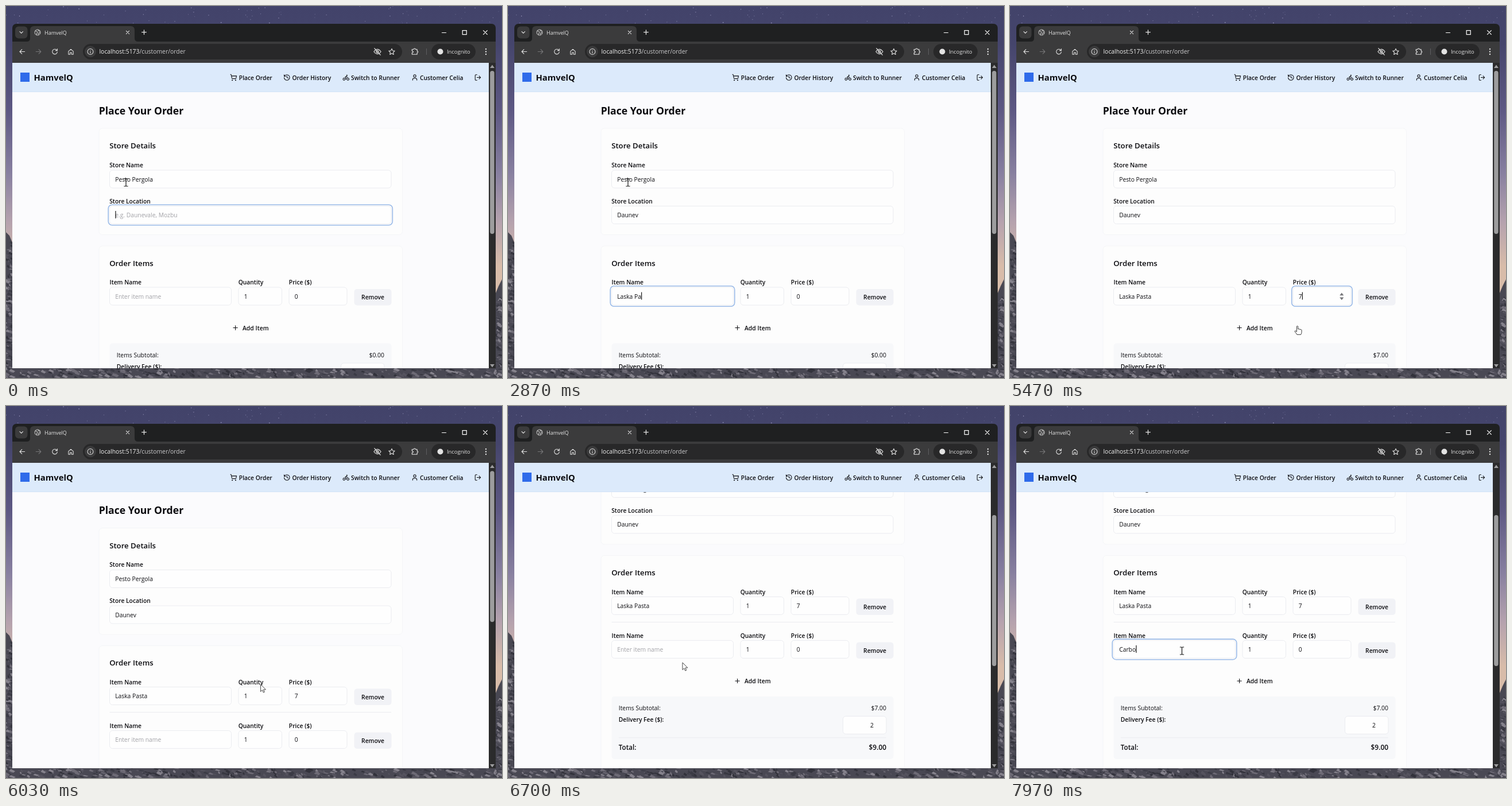
An HTML page for the animation above (8000 ms loop, 864 by 648 pixels).

```html
<!DOCTYPE html>
<html lang="en">
<head>
<meta charset="utf-8">
<title>Place Your Order</title>
<style>
html, body { margin: 0; width: 100%; height: 100%; overflow: hidden; background: #43446a; }
svg { display: block; width: 100vw; height: 100vh; }
text { font-family: "Open Sans", "Noto Sans", sans-serif; white-space: pre; }
</style>
</head>
<body>
<svg id="stage" viewBox="0 0 864 648"></svg>
<script>
const LOOP = 8000, ROW = 76, NOTCH = 78.8, BASE = 10.3;
const INK = '#0b0b0f', HINT = '#a1a1a6', LINE = '#e9eaef', CHROME = '#e3e3e3';

// ---- markup helpers ----
const rect = (x, y, w, h, fill, r = 0, more = '') =>
  `<rect x="${x}" y="${y}" width="${w}" height="${h}" rx="${r}" fill="${fill}" ${more}/>`;

// y is the middle of the capitals
function text(x, y, str, o = {}) {
  const size = o.size || BASE;
  return `<text ${o.id ? `id="${o.id}"` : ''} x="${x}" y="${y + size * 0.355}" font-size="${size}"` +
    ` font-weight="${o.weight || 400}" fill="${o.fill || INK}" text-anchor="${o.anchor || 'start'}">${str}</text>`;
}
const bold = (x, y, str, o = {}) => text(x, y, str, { weight: 600, ...o });

const ring = (x, y, r) => `M${x - r} ${y}a${r} ${r} 0 1 0 ${2 * r} 0a${r} ${r} 0 1 0 ${-2 * r} 0`;

function icon(cx, cy, size, d, color = CHROME, width = 2) {
  const k = size / 24;
  return `<path transform="translate(${cx - size / 2} ${cy - size / 2}) scale(${k})" d="${d}" fill="none"` +
    ` stroke="${color}" stroke-width="${width}" stroke-linecap="round" stroke-linejoin="round"/>`;
}

const ICON = {
  cart: ring(8, 21, 1) + ring(19, 21, 1) +
    'M2 2h2l2.7 12.4a2 2 0 0 0 2 1.6h9.8a2 2 0 0 0 1.9-1.6l1.6-7.4H5.1',
  history: 'M3 12a9 9 0 1 0 9-9 9.75 9.75 0 0 0-6.7 2.7L3 8M3 3v5h5M12 7v5l4 2',
  bike: ring(18.5, 17.5, 3.5) + ring(5.5, 17.5, 3.5) + ring(15, 5, 1) + 'M12 17.5V14l-3-3 4-3 2 3h2',
  user: 'M19 21v-2a4 4 0 0 0-4-4H9a4 4 0 0 0-4 4v2' + ring(12, 7, 4),
  logout: 'M9 21H5a2 2 0 0 1-2-2V5a2 2 0 0 1 2-2h4M16 17l5-5-5-5M21 12H9',
  plus: 'M5 12h14M12 5v14',
  cross: 'M5 5l14 14M19 5L5 19',
  chevron: 'M6 9l6 6 6-6',
  back: 'M20 12H4M11 5l-7 7 7 7',
  forward: 'M4 12h16M13 5l7 7-7 7',
  reload: 'M20 13a8 8 0 1 1-2.4-6.7L20 8.5M20 3v5.5h-5.5',
  home: 'M4 11l8-7 8 7v10h-5.5v-6h-5v6H4z',
  info: ring(12, 12, 9.5) + 'M12 11v6M12 7.4v.2',
  eye: 'M1.5 12Q12-2 22.5 12Q12 26 1.5 12z' + ring(12, 12, 3.5) + 'M3 2l18 20',
  star: 'M12 2.5l2.9 6.3 6.8.8-5 4.7 1.3 6.8-6-3.4-6 3.4 1.3-6.8-5-4.7 6.8-.8z',
  puzzle: 'M4 6h5a2.6 2.6 0 1 1 5.2 0H19v5a2.6 2.6 0 1 1 0 5.2V21H4v-5a2.6 2.6 0 1 0 0-5z',
  globe: ring(12, 12, 9.5) + 'M4 7l5 1 3 4-3 3v5M20 8l-5-1-1-4M21 14l-4-1-3 3 1 4'
};

// ---- desktop ----
let seed = 11;
const rnd = () => (seed = seed * 16807 % 2147483647) / 2147483647;

function desktop() {
  const stops = [[0, '#42436a'], [0.1, '#45456c'], [0.28, '#5d5883'], [0.45, '#8880a0'], [0.58, '#b5a2ae'], [0.7, '#d8bca9']];
  let s = '<linearGradient id="sky" x2="0" y2="1">' +
    stops.map(([o, c]) => `<stop offset="${o}" stop-color="${c}"/>`).join('') + '</linearGradient>';
  s += rect(0, 0, 864, 648, 'url(#sky)');
  for (let i = 0; i < 75; i++) {
    const r = 0.3 + rnd() * 0.5;
    s += `<circle cx="${rnd() * 864}" cy="${rnd() * 31}" r="${r}" fill="#b9b8dc" opacity="${0.3 + rnd() * 0.6}"/>`;
  }
  s += '<path d="M0 394L6 400L11 412V628H853V500L858 488L864 476V648H0z" fill="#494853"/>';
  const tones = ['#32323b', '#55535e', '#6e6b76', '#85828c', '#3b3b45'];
  const shards = (n, x, y, w, h) => {
    for (let i = 0; i < n; i++) {
      const px = x + rnd() * w, py = y + rnd() * h, a = 2 + rnd() * 7, b = 1 + rnd() * 4;
      s += `<path d="M${px} ${py}l${a} ${b}l${-a * 0.4} ${b * 0.6}l${-a} ${-b * 0.7}z" fill="${tones[i % 5]}"/>`;
    }
  };
  shards(100, -3, 408, 12, 235);
  shards(340, 0, 630, 864, 15);
  shards(65, 853, 502, 10, 140);
  return s;
}

// ---- browser window ----
function browser() {
  const bar = '#3b3b3c', dark = '#282829', tip = { size: 9, fill: CHROME };
  return `<path d="M11 631V38a7 7 0 0 1 7-7H846a7 7 0 0 1 7 7V631z" fill="#1f2021"/>` +
    rect(11, 62, 842, 37, bar) +
    rect(16, 35.5, 21.5, 21, bar, 6) + icon(26.7, 46, 11, ICON.chevron, CHROME, 2.6) +
    `<path d="M36 62q6 0 6-6V42q0-7 7-7H217q7 0 7 7V56q0 6 6 6z" fill="${bar}"/>` +
    icon(55, 46, 12.5, ICON.globe, '#c8c8c8') +
    text(67, 46.5, 'HamvelQ', tip) +
    icon(212, 46, 9, ICON.cross, CHROME, 2.8) + icon(240.5, 45.7, 13, ICON.plus, CHROME, 2.4) +
    `<path d="M759 46.5h8M795.2 42.6h7v7h-7zM831.2 42.4l7.4 7.4M838.6 42.4l-7.4 7.4" stroke="#fff" stroke-width="1.2" fill="none"/>` +
    icon(28.3, 79.5, 13, ICON.back) + icon(56.5, 79.5, 13, ICON.forward, '#747476') +
    icon(85, 79.5, 13, ICON.reload) + icon(113, 79.5, 12.5, ICON.home) +
    rect(134, 66, 556, 27, dark, 13.5) + `<circle cx="147" cy="79.5" r="10" fill="${bar}"/>` +
    icon(147, 79.5, 12.5, ICON.info) +
    text(162.5, 79.7, 'localhost:5173<tspan fill="#c9c9cb">/customer/order</tspan>', { size: 10.38, fill: '#f0f0f0' }) +
    icon(647, 79.5, 14, ICON.eye) + icon(672, 79.5, 13, ICON.star) + icon(712, 79, 14, ICON.puzzle) +
    rect(732, 74, 1, 11, '#5e5e60') + rect(741, 66, 77, 27, dark, 13.5) +
    `<circle cx="756.5" cy="79.5" r="5" fill="${CHROME}"/>` + text(768, 79.7, 'Incognito', { size: 9.4, fill: CHROME }) +
    [75, 79.5, 84].map(y => `<circle cx="836" cy="${y}" r="1.2" fill="${CHROME}"/>`).join('');
}

function header() {
  const nav = (ix, glyph, tx, label) => icon(ix, 124.5, 12.6, ICON[glyph], INK) + bold(tx, 125, label);
  return rect(11, 99, 830, 51, '#dceafb') + rect(11, 149, 830, 1, '#d3e3f6') +
    rect(25, 116, 16, 16, '#2f6bea') +
    bold(48.5, 125, 'HamvelQ', { size: 14.8, weight: 700 }) +
    nav(396.3, 'cart', 405.8, 'Place Order') + nav(489.3, 'history', 498.5, 'Order History') +
    nav(592.3, 'bike', 601, 'Switch to Runner') + nav(712, 'user', 721, 'Customer Celia') +
    icon(822, 124.5, 12.6, ICON.logout, INK);
}

function scrollbar() {
  return rect(841, 99, 12, 532, '#2b2b2c') + rect(843.2, 113, 7.4, 284, '#9d9d9e', 3.7, 'id="thumb"') +
    '<path d="M843 108l4-5.5 4 5.5zM843 624l4 5.5 4-5.5z" fill="#9d9d9e"/>';
}

// ---- page ----
const BOX = {
  store: [180.5, 286, 490.5], loc: [180.5, 348.5, 490.5],
  item: [180.5, 490, 212], qty: [405, 490, 75.5], price: [493, 490, 101],
  item2: [180.5, 490 + ROW, 212]
};

function field([x, y, w], id, value, fill) {
  return rect(x, y, w, 31, '#fefefe', 5, `stroke="${LINE}" stroke-width="0.9"`) +
    text(x + 9.7, y + 15.9, value, { id, fill });
}

function itemRow(dy, ids) {
  const at = ([x, y, w]) => [x, y + dy, w];
  return bold(180.5, 481.5 + dy, 'Item Name') + bold(404.7, 481.5 + dy, 'Quantity') + bold(492.8, 481.5 + dy, 'Price ($)') +
    field(at(BOX.item), ids[0], '') + field(at(BOX.qty), '', '1') + field(at(BOX.price), ids[1], '0') +
    rect(606.5, 493 + dy, 65, 28.5, '#f1f2f6', 5) + bold(639, 507.6 + dy, 'Remove', { anchor: 'middle' });
}

function page() {
  const edge = `stroke="#f3f4f7" stroke-width="0.8"`;
  const end = { anchor: 'end', size: 10.4 };
  return rect(11, 99, 830, 900, '#fbfbfd') +
    bold(161.7, 182.5, 'Place Your Order', { size: 17.63, weight: 700 }) +
    rect(162, 213, 528.5, 185.5, '#fdfdfd', 6, edge) +
    bold(180.2, 243.5, 'Store Details', { size: 13.2 }) +
    bold(180.2, 277, 'Store Name') + field(BOX.store, '', 'Pesto Pergola') +
    bold(180.2, 340, 'Store Location') + field(BOX.loc, 'loc', '') +
    rect(162, 418, 528.5, 400, '#fdfdfd', 6, edge) +
    bold(180.2, 448, 'Order Items', { size: 13.2 }) +
    itemRow(0, ['item', 'price']) +
    `<g id="second">${rect(180.5, 533.6, 490.5, 0.9, LINE)}${itemRow(ROW, ['item2', 'price2'])}</g>` +
    '<g id="below">' +
    icon(399.6, 560.5, 12.6, ICON.plus, INK) + bold(412, 561.3, 'Add Item', { size: 10.4 }) +
    rect(180.5, 587.5, 491, 109, '#f7f8fa', 5) +
    text(192.8, 608.4, 'Items Subtotal:', { size: 10.4 }) + text(659, 608.4, '', { id: 'sub', ...end }) +
    bold(192.8, 628, 'Delivery Fee ($):') +
    rect(583.5, 622, 75.5, 31, '#fefefe', 5, `stroke="${LINE}" stroke-width="0.9"`) + text(637, 638, '2', end) +
    rect(192.8, 659, 466, 0.9, LINE) +
    bold(192.8, 676.3, 'Total:', { size: 11.6 }) + bold(659, 676.3, '', { id: 'total', size: 11.9, anchor: 'end' }) +
    '</g>' +
    '<rect id="focus" height="35.6" rx="6.5" fill="none" stroke="#9bbbe8" stroke-width="1.6"/>' +
    '<path id="spin" d="M0-1.6l3.6-4.6 3.6 4.6zM0 1.8l3.6 4.6 3.6-4.6z" fill="#77777b"/>' +
    rect(0, 0, 1.1, 13, '#000', 0, 'id="caret"');
}

const cursors =
  '<path id="beam" d="M-3.6-6.5h2.4q1.2 0 1.2 1.2q0-1.2 1.2-1.2h2.4M0-5.3V5.3M-3.6 6.5h2.4q1.2 0 1.2-1.2q0 1.2 1.2 1.2h2.4" fill="none" stroke="#111" stroke-width="1.2"/>' +
  '<path id="arrow" d="M0 0V12.6L2.9 9.9L4.8 14.2L6.8 13.3L4.9 9.1H8.9z" fill="#fff" stroke="#333" stroke-width="0.9" stroke-linejoin="round"/>' +
  '<path id="hand" d="M-2.6-7q1.2-1.4 2.3 0V-2.2q1.3-1 2.2.4q1.3-.8 2.1.5q1.5-.6 2 .8V3.4q-.2 2.4-1.4 4H-2.1q-1-2-3.6-5q-.6-1.6.8-1.7L-2.6 2.4z" fill="#fff" stroke="#222" stroke-width="0.9" stroke-linejoin="round"/>';

document.getElementById('stage').innerHTML =
  desktop() + browser() +
  '<clipPath id="view"><rect x="11" y="99" width="830" height="532"/></clipPath>' +
  `<g clip-path="url(#view)"><g id="page">${page()}</g>${header()}</g>` + scrollbar() + cursors;

// ---- timeline ----
const $ = id => document.getElementById(id);
const set = (id, attrs) => { for (const k in attrs) $(id).setAttribute(k, attrs[k]); };
const show = (id, on) => set(id, { visibility: on ? 'visible' : 'hidden' });
const move = (id, x, y) => set(id, { transform: `translate(${x} ${y})` });

const TYPING = {
  loc: { word: 'Daunev', times: [200, 370, 560, 730, 930, 1130], hint: 'e.g. Daunevale, Mozbu' },
  item: { word: 'Laska Pasta', times: [1830, 2100, 2200, 2300, 2400, 2470, 2870, 2870, 2940, 3010, 3080], hint: 'Enter item name' },
  item2: { word: 'Carbo', times: [7430, 7560, 7700, 7830, 7950], hint: 'Enter item name' }
};
const FOCUS = [[0, 'loc'], [1430, 'item'], [3220, 'qty'], [3380, 'price'], [5650, ''], [7130, 'item2']];
const POINTER = [[0, 'beam'], [4200, 'arrow'], [5080, 'hand'], [5800, 'arrow'], [6850, 'beam']];
const PATH = [[0, 209, 307.5], [4100, 209, 307.5], [4600, 370, 425], [5000, 480, 543], [5250, 502, 565], [5720, 502, 565],
  [6050, 440, 480], [6300, 389.5, 437.5], [6700, 304, 447], [7000, 299.5, 426.5], [LOOP, 299.5, 426.5]];
const PRICED = 3600, ADDED = 5650;

const latest = (list, t) => list.filter(e => e[0] <= t).pop()[1];
const ease = (t, from, to) => {
  const p = Math.min(1, Math.max(0, (t - from) / (to - from)));
  return p * p * (3 - 2 * p);
};

function mouse(t) {
  const i = PATH.findIndex(p => p[0] > t), a = PATH[i - 1], b = PATH[i];
  const p = (t - a[0]) / (b[0] - a[0]);
  return [a[1] + (b[1] - a[1]) * p, a[2] + (b[2] - a[2]) * p];
}

function draw(t) {
  const added = t >= ADDED, priced = t >= PRICED, focus = latest(FOCUS, t);
  const scroll = NOTCH * (ease(t, 6020, 6260) + ease(t, 6272, 6525));

  for (const id in TYPING) {
    const { word, times, hint } = TYPING[id];
    const n = times.filter(s => s <= t).length;
    $(id).textContent = n ? word.slice(0, n) : hint;
    set(id, { fill: n ? INK : HINT });
    TYPING[id].count = n;
  }
  $('price').textContent = priced ? '7' : '0';
  $('sub').textContent = priced ? '$7.00' : '$0.00';
  $('total').textContent = priced ? '$9.00' : '$2.00';

  set('second', { display: added ? 'inline' : 'none' });
  move('below', 0, added ? ROW : 0);
  move('page', 0, -scroll);
  set('thumb', { y: 113 + scroll * 0.489, height: added ? 263 : 284 });

  const number = focus === 'qty' || focus === 'price';
  show('focus', focus);
  show('spin', number);
  show('caret', focus);
  if (focus) {
    const [x, y, w] = BOX[focus];
    set('focus', { x: x - 2.3, y: y - 2.3, width: w + 4.6 });
    move('spin', x + w - 19.8, y + 15.8);
    const typed = TYPING[focus] ? TYPING[focus].count : 1;
    const len = number ? BASE * 0.572 : typed ? $(focus).getSubStringLength(0, typed) : 0;
    set('caret', { x: x + 9.9 + len, y: y + 8.5 });
  }

  const kind = latest(POINTER, t), [mx, my] = mouse(t);
  for (const id of ['beam', 'arrow', 'hand']) {
    show(id, id === kind);
    move(id, mx, my);
  }
}

const start = performance.now();
function tick(now) {
  draw(Math.max(0, now - start) % LOOP);
  requestAnimationFrame(tick);
}
draw(0);
requestAnimationFrame(tick);
</script>
</body>
</html>
```
